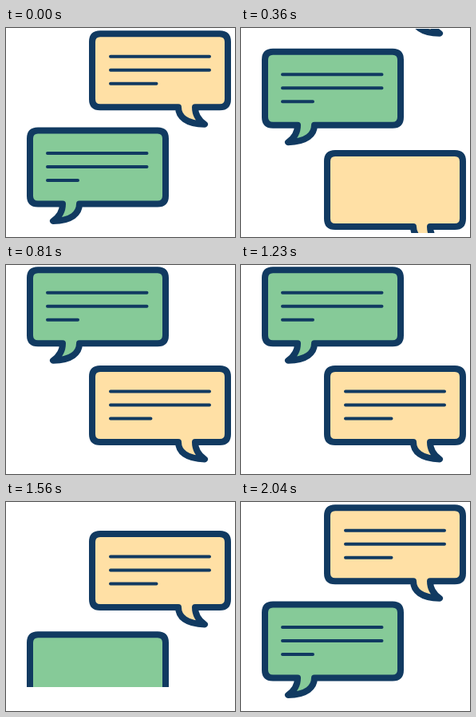
These frames come from a looping animation (287x262 px, 2430 ms). An HTML page:

```html
<!DOCTYPE html>
<html>
<head>
<meta charset="utf-8">
<style>
  html, body { margin: 0; width: 100%; height: 100%; overflow: hidden; background: #fff; }
  svg { display: block; width: 100%; height: 100%; }
  path { stroke: #113a61; stroke-linecap: round; stroke-linejoin: round; }
</style>
</head>
<body>
<svg viewBox="0 0 287 262">
  <clipPath id="view"><rect id="win" x="26" width="256"/></clipPath>
  <g id="scene" clip-path="url(#view)"></g>
</svg>
<script>
const LOOP = 2430, STEP = 30, EXIT = 141;
const scene = document.getElementById('scene');
const win = document.getElementById('win');

const outline = 'M118 4H268Q278 4 278 14V86Q278 96 268 96H237' +
  'C237 104 241 112 249 117.5C226 117 216 108 216 96H118Q108 96 108 86V14Q108 4 118 4Z';

const yellow = { fill: '#ffe0a5', flip: '', x: 131, ends: [255, 255, 188.5], high: 3.3, low: 126 };
const green = { fill: '#86ca98', flip: 'translate(308) scale(-1 1)', x: 52, ends: [176.5, 176.5, 90], high: 2.3, low: 124.6 };

const clamp = v => Math.min(1, Math.max(0, v));
const smooth = v => v * v * (3 - 2 * v);
const ease = u => u < .5 ? .5 * (2 * u) ** 2.5 : 1 - .5 * (2 - 2 * u) ** 2.5;

// typed: 0 to 3 lines written
function bubble(kind, y, typed = 3) {
  const lines = kind.ends.map((end, i) => {
    const part = smooth(clamp(typed - i));
    return part ? `M${kind.x} ${32.5 + 17 * i}H${kind.x + (end - kind.x) * part}` : '';
  }).join('');
  return `<g transform="translate(0 ${y})">
    <path d="${outline}" transform="${kind.flip}" fill="${kind.fill}" stroke-width="8"/>
    <path d="${lines}" fill="none" stroke-width="4"/></g>`;
}

function draw(t) {
  const second = t >= 1230;
  const [top, low] = second ? [green, yellow] : [yellow, green];
  const u = clamp(second ? (t - 1230) / 540 : (t - 8) / 534);
  const p = ease(u);
  const typed = clamp((t - (second ? 1628 : 428)) / 412) * 3;

  // the window narrows briefly during the second move
  const pinch = second ? Math.sin(Math.PI * u) ** 6 : 0;
  win.setAttribute('y', 1 + 42.8 * pinch);
  win.setAttribute('height', 256 - 79 * pinch);

  scene.innerHTML =
    bubble(top, top.high - EXIT * p) +
    bubble(low, low.low + (low.high - low.low) * p) +
    bubble(top, top.low + EXIT * (1 - p), typed);
}

const start = performance.now();
function frame() {
  const t = (performance.now() - start) % LOOP;
  draw(Math.floor(t / STEP) * STEP);
  requestAnimationFrame(frame);
}
frame();
</script>
</body>
</html>
```
